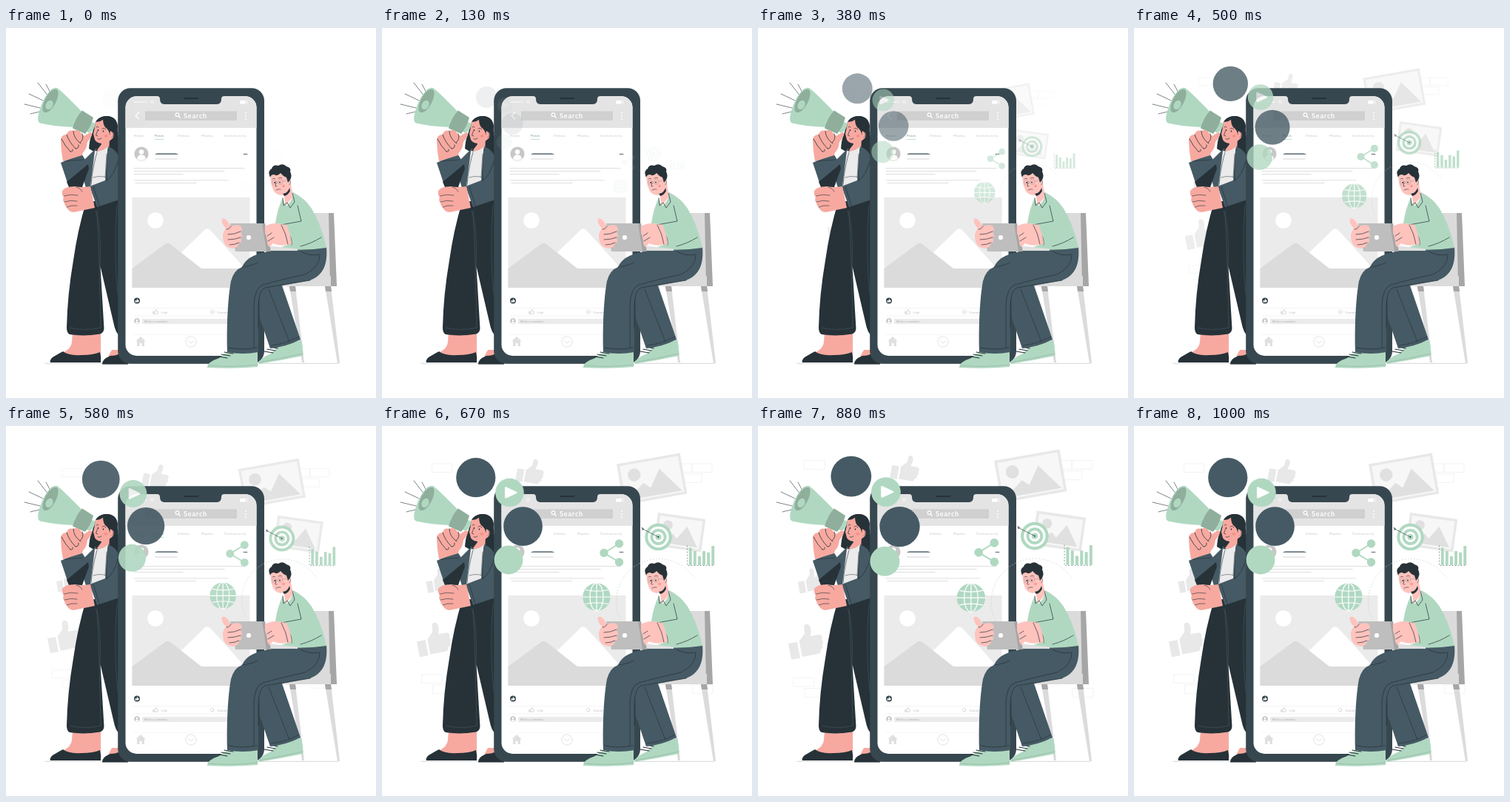
Animation, 500 px wide and 500 px high, one loop 1040 ms. Source, as an HTML page with a canvas:

```html
<!DOCTYPE html>
<html lang="en">
<head>
<meta charset="utf-8">
<title>Social feed</title>
<style>
  html, body { margin: 0; width: 100%; height: 100%; overflow: hidden; background: #fff; }
  canvas { display: block; width: 500px; height: 500px; }
</style>
</head>
<body>
<canvas id="stage"></canvas>
<script>
const SIZE = 500, LOOP = 1040, FRAMES = 25;
const ratio = window.devicePixelRatio || 1;
const INK = '#263238', SLATE = '#455a64', CASE = '#37474f', GREEN = '#b0d8c1',
      MOSS = '#8fae9c', SKIN = '#f7a9a0', ROSE = '#ffc3bd', WHITE = '#fff',
      G1 = '#ebebeb', G2 = '#e0e0e0', G3 = '#c7c7c7', G4 = '#a6a6a6', CHAIR = '#dbdbdb';

function surface(c) {
  c.width = c.height = SIZE * ratio;
  return c.getContext('2d');
}
const screen = surface(document.getElementById('stage'));
const layer = surface(document.createElement('canvas'));
let g = screen;

// ---- drawing helpers ----
function fill(d, color) {
  g.fillStyle = color;
  g.fill(new Path2D(d));
}
function line(d, color = INK, width = 0.7) {
  g.strokeStyle = color;
  g.lineWidth = width;
  g.lineCap = g.lineJoin = 'round';
  g.stroke(new Path2D(d));
}
function oval(x, y, rx, ry, color, turn = 0) {
  g.beginPath();
  g.ellipse(x, y, rx, ry, turn, 0, Math.PI * 2);
  g.fillStyle = color;
  g.fill();
}
const disc = (x, y, r, color) => oval(x, y, r, r, color);
function ring(x, y, r, color, width, rx = r) {
  g.beginPath();
  g.ellipse(x, y, rx, r, 0, 0, Math.PI * 2);
  g.strokeStyle = color;
  g.lineWidth = width;
  g.stroke();
}
function box(x, y, w, h, r, color) {
  g.beginPath();
  g.roundRect(x, y, w, h, r);
  g.fillStyle = color;
  g.fill();
}
function label(text, x, y, px, color, weight = 400, gap = 0.3) {
  g.font = `${weight} ${px}px Lato, Inter, sans-serif`;
  g.letterSpacing = gap + 'px';
  g.fillStyle = color;
  g.fillText(text, x, y);
}
function placed(x, y, degrees, scale, draw) {
  g.save();
  g.translate(x, y);
  g.rotate(degrees * Math.PI / 180);
  g.scale(scale, scale);
  draw();
  g.restore();
}

// ---- backdrop group ----
function thumb(x, y, degrees, scale, color = '#e8e8e8') {
  placed(x, y, degrees, scale, () => fill(
    'M0 21H12V43H0Z M15 21L24 12L25 2Q30 -3 33 4Q34 10 31 17H43Q48 19 45 24Q48 29 44 31' +
    'Q46 36 41 37Q41 42 37 42H15Z', color));
}
function photo(x, y, degrees, w, h) {
  placed(x, y, degrees, 1, () => {
    box(0, 0, w, h, 0, '#e8e8e8');
    box(3.5, 3.5, w - 7, h - 7, 0, '#f7f7f7');
    disc(w * 0.24, h * 0.33, w * 0.1, G2);
    const b = h - 5.5;
    fill(`M7 ${b}L${w * 0.36} ${h * 0.56}L${w * 0.46} ${h * 0.7}L${w * 0.64} ${h * 0.29}` +
         `L${w - 6} ${b}Z`, G2);
  });
}
function brick(x, y) {
  line(`M${x} ${y}h27v11.5h-27Z`, G1, 0.6);
}
function backdrop() {
  for (const [x, y] of [[68, 51], [419, 51], [405, 65], [392, 51], [54, 336],
                        [69, 350], [420, 350]]) brick(x, y);
  photo(373, 117, 8, 65, 45);
  photo(317, 51.5, -10, 87, 56);
  thumb(43, 271, -11, 0.98);
  thumb(57, 196, -10, 0.7);
  thumb(186, 41, 10, 0.78);
}

// ---- badges on the left of the phone ----
function badges() {
  disc(126.8, 69.7, 26.6, SLATE);
  disc(172.5, 90, 19.3, GREEN);
  fill('M166 83.5Q166 81.5 168 82.5L182 89Q183.5 90 182 91L168 97.5Q166 98 166 96Z', WHITE);
  disc(190.5, 135.7, 26.4, SLATE);
  disc(171, 181, 19.4, GREEN);
}

// ---- icons on the right ----
function icons() {
  g.setLineDash([1, 3]);
  g.beginPath();
  g.arc(374, 237, 57.5, 2.7, 5.7);
  g.strokeStyle = '#c0d3c8';
  g.lineWidth = 0.7;
  g.stroke();
  line('M412.5 162V188.5H450', SLATE, 0.6);
  g.setLineDash([]);

  line('M320.5 159L300 171.5L320.5 184', GREEN, 2);
  for (const [x, y] of [[320.5, 159], [300, 171.5], [320.5, 184]]) disc(x, y, 5.7, GREEN);

  disc(290, 231, 18.7, GREEN);
  ring(290, 231, 18.7, WHITE, 1.2, 9);
  line('M290 212V250M271 231H309M275 221.5Q290 225 305 221.5M275 240.5Q290 237 305 240.5', WHITE, 1.2);

  [18.3, 14.2, 11, 7.2, 4].forEach((r, i) => disc(373.5, 150, r, i % 2 ? WHITE : GREEN));
  line('M352 139L373.5 150M351.5 137.5L354 139L352.5 140.5Z', INK, 0.6);
  disc(373.5, 150, 0.9, INK);

  [23.5, 19, 12, 19, 17, 26].forEach((h, i) => box(414.8 + i * 6.1, 188 - h, 3.9, h, 0, GREEN));
}

// ---- phone ----
function avatar(x, y, r) {
  disc(x, y, r, G3);
  disc(x, y - r * 0.25, r * 0.34, WHITE);
  fill(`M${x - r * 0.6} ${y + r * 0.75}Q${x - r * 0.6} ${y + r * 0.12} ${x} ${y + r * 0.12}` +
       `Q${x + r * 0.6} ${y + r * 0.12} ${x + r * 0.6} ${y + r * 0.75}Q${x} ${y + r * 1.1} ${x - r * 0.6} ${y + r * 0.75}Z`, WHITE);
}
function header() {
  box(161.5, 92.3, 177, 42.7, [15, 15, 0, 0], '#e4e4e4');
  fill('M204 92Q208 92 208 96Q208 103 214 103H285Q291 103 291 96Q291 92 295 92Z', CASE);
  line('M241 95H259', INK, 2);
  for (let i = 0; i < 5; i++) disc(174 + i * 3.7, 100, 1.1, WHITE);
  line('M195 99.3Q197.5 97.2 200 99.3M196.3 101Q197.5 100 198.7 101', WHITE, 0.9);
  box(316, 98, 8, 4.5, 1, WHITE);
  line('M326 98V102.5', WHITE, 0.7);
  line('M179.5 114L175 118.5L179.5 123', WHITE, 1.3);
  box(188, 112.5, 124, 12.5, 0, '#d0d0d0');
  ring(231.5, 117.3, 2.4, WHITE, 1.2);
  line('M233.3 119.2L235.3 121.2', WHITE, 1.4);
  label('Search', 240, 122, 9.2, WHITE, 700, 0.75);
  for (const y of [115, 119, 123]) disc(324, y, 0.9, WHITE);
}
function post() {
  const tab = '#bdbdbd';
  label('Home', 173, 147, 4.5, tab);
  label('Posts', 201, 147, 4.5, MOSS, 700);
  label('Videos', 232, 147, 4.5, tab, 400, 0.45);
  label('Photos', 264, 147, 4.5, tab, 400, 0.45);
  label('Community', 295, 147, 4.5, tab, 400, 0.8);
  line('M201.5 150.5H213', GREEN, 0.8);
  avatar(183, 170, 9.6);
  line('M202 170.5H232M204 169.8H230', SLATE, 0.8);
  line('M202 177H231', G3, 0.8);
  for (const x of [321.7, 323.5, 325.3]) disc(x, 170.5, 0.7, INK);
  line('M173 189.5H322M173 193.5H295M173 197.5H239M173 205.8H300M175 209.5H257', '#c9c9c9', 0.6);

  box(170.5, 229, 159, 122, 0, G1);
  disc(202, 260, 10.8, WHITE);
  fill('M220 320L268 273Q272 269.5 276 273L323 325H230Z', WHITE);
  fill('M170.5 325L215 292Q218.5 289 222 292L264 325H329.5V351H170.5Z', '#dbdbdb');

  disc(177, 368.5, 4, CASE);
  thumb(174.5, 366, 0, 0.11, WHITE);
  line('M172 378.5H330M172 389H330', G1, 0.6);
  placed(199, 380.5, 0, 0.14, () =>
    line('M0 20H10V42H0ZM14 20L24 10V0Q33 -2 32 17H44V40H14Z', '#b5b5b5', 3.5));
  label('Like', 210, 386, 4.2, '#b5b5b5');
  ring(278.8, 383.7, 2.2, '#b5b5b5', 0.5);
  label('Comment', 285.5, 386, 4.2, '#b5b5b5');
  avatar(177, 396, 3.8);
  box(184, 393, 144, 7, 0, G1);
  label('Write a comment...', 187, 398, 3.6, G4, 400, 0.25);

  line('M172 414.5H330', '#f2f2f2', 0.6);
  fill('M182 417L188.5 423H187V430H183.7V426H180.3V430H177V423H175.5Z', G2);
  ring(250, 424, 7.2, G2, 0.9);
  line('M246.8 422.8L250 426L253.2 422.8', G2, 0.9);
}
function phone() {
  box(151.2, 81.2, 197.8, 372.6, 17, CASE);
  box(161.5, 92.3, 177, 350.7, 15, WHITE);
  header();
  post();
}

// ---- woman with megaphone ----
function megaphone() {
  line('M43 74L57 92M54 76L61 89M31 89L50 98M25 103L46 108M33 116L46 113', INK, 0.6);
  fill('M69 81Q72 82 102.5 113L91 134Q66 133 46 128.5Q40 126 47 106Q58 79 69 81Z', GREEN);
  oval(60, 98.5, 17.5, 7.5, MOSS, -1.08);
  oval(58.5, 104, 6.5, 4.7, GREEN, -1.08);
  fill('M109 124L121 129Q119 139 113 142L105 138Z', GREEN);
  fill('M103 111.5L118 121Q115 133 107 143L90 135.5Q94 121 103 111.5Z', MOSS);
}
function womanLegs() {
  fill('M90 411H128V443Q100 447 75 440Q89 433 89 424Z', SKIN);
  fill('M143 435H156V448H136Z', SKIN);
  fill('M60 452Q58 447 68 442Q73 439 77 437Q84 443 102 442Q118 442 127 438Q129 445 128 452Z', INK);
  fill('M130 454.5Q129 448 141 443Q150 443 155 439L165 446V454.5Z', INK);
  fill('M108 236L154 228V416Q148 413 145 397L127.5 322Q130 365 132.5 406Q132 412 127 413.5' +
       'Q105 417 86 414Q82 412 82 405Q83 360 91 314Q97 272 108 236Z', INK);
  line('M121 247Q129 263 127 325M123 247Q126 303 128 404M150 240Q145 300 151 360M86 405Q106 410 128 405', SLATE, 0.6);
}
function womanHead() {
  fill('M121 127C126 117 149 114 151 132Q150 145 154 153V188L139 181Q124 170 112 163Q113 150 116 144Z', INK);
  fill('M128 147L140 150L139 167Q130 174 123 165L129 157Z', SKIN);
  fill('M121 127Q128 126 132 123Q135 133 144 139Q148 147 142 151Q139 154 134 156' +
       'Q123 157 120 151L118 143Q120 136 121 127Z', SKIN);
  fill('M122 126C128 117 145 116 149 128L147 143L141 139L140 145Q140 138 134 134Q131 130 131 123Q127 128 122 126Z', INK);
  line('M122 134Q123 132 125 134M130 136Q133 134 135 137M123.5 139L121.5 145L124 146M124 150Q127 151 129 149', INK, 0.7);
  disc(124.5, 138, 0.9, INK);
  disc(131.5, 139.5, 0.9, INK);
  oval(135, 146, 2.6, 1.8, '#f48f87');
  line('M144 142Q147 144 143 148', INK, 0.5);
}
function womanBody() {
  fill('M122 162L106 178L101 192L108 216H118L122 190Z', SLATE);
  fill('M120 166Q130 168 138 160L148 172L140 210Q128 216 114 214Z', G1);
  line('M118 202Q128 199 136 202M136 170L134 202', INK, 0.5);
  line('M123 168Q117 188 115 212', INK, 0.6);
  fill('M74 182L102 170L111 184L83 209Z', SLATE);
  fill('M82 208L111 184L112 190L103 215H85Z', INK);
  line('M79 180L104 178', INK, 0.6);
  fill('M138 160Q151 165 153 177V232L123 242L113 214L134 206Z', SLATE);
  line('M138 163Q135 183 136 207M118 214L126 240M151 180Q146 200 136 206', INK, 0.7);
}
function womanHands() {
  fill('M74 151Q75 144 82 144Q84 137 91 139Q98 136 102 143L106 146Q113 140 116 142' +
       'Q117 146 110 154Q109 164 104 168L103 172L77 180Q74 165 74 151Z', SKIN);
  line('M75 150Q80 160 87 167M82 144Q85 154 94 163M91 139Q91 149 101 156M103 143Q106 150 100 155M87 167Q91 168 90 164M94 163Q99 163 98 158', INK, 0.8);
  fill('M114 214Q101 216 94 214Q79 214 76 220Q75 225 78 228Q76 233 79 236Q79 240 82 242' +
       'Q84 248 91 249L120 243Z', SKIN);
  line('M78 227Q87 224 97 226M79 235Q88 232 96 234M82 242Q89 239 96 240M95 215Q101 217 103 221', INK, 0.6);
}
function woman() {
  womanLegs();
  womanHead();
  womanBody();
  megaphone();
  womanHands();
}

// ---- chair and seated man ----
function chair() {
  fill('M409 250H437L441 349H400Z', CHAIR);
  fill('M436 250H443L447 349H438Z', G4);
  fill('M366 335H439V349H370Z', CHAIR);
  fill('M383 349H391L403 452H400Z', CHAIR);
  fill('M431 349H439L451 453H448Z', CHAIR);
  fill('M383 349H391L392 356H384ZM431 349H439L440 356H432Z', G4);
}
function manLegs() {
  fill('M341 454Q343 446 358 440Q368 429 374 427L399 422Q402 433 401 443Q372 449 341 454Z', GREEN);
  line('M349 437L361 439M353 434L364 436M357 431L367 433', INK, 1.1);
  line('M341 452Q370 447 401 440', MOSS, 0.6);
  fill('M342 352L372 345L398 421Q378 431 357 433L343 392Z', SLATE);
  line('M355 353L383 424M358 429Q378 427 396 417', INK, 0.6);
  fill('M272 458Q273 451 288 446Q298 437 304 438H340V458Q306 461 272 459Z', GREEN);
  line('M287 444L299 446M291 441L303 443M295 438L307 440', INK, 1.1);
  line('M273 456Q306 459 340 455', MOSS, 0.6);
  fill('M366 298L433 296C435 319 429 334 411 341Q379 347 350 352Q341 354 341 379V438' +
       'Q320 442 299 438C298 399 300 364 304 342Q308 327 319 323Q325 308 350 303Z', SLATE);
  line('M411 341Q379 346 350 351Q341 354 341 379V404M424 307Q424 323 404 333Q372 340 347 347Q336 351 335 375V431' +
       'M301 432Q320 436 339 432M319 323Q331 322 340 317M398 302Q411 309 424 306', INK, 0.7);
}
function manHead() {
  fill('M374 217L384 205L388 228L378 240Z', ROSE);
  fill('M358 196Q368 191 381 200Q387 203 384 209L382 218Q377 225 371 226Q362 224 360 216Q356 206 358 196Z', ROSE);
  fill('M357 202Q353 193 359 190Q361 184 368 186Q374 182 379 187Q386 189 384 194Q387 200 384 205' +
       'L381 209L379 202Q374 200 371 196Q367 201 362 198Q358 198 357 202Z', INK);
  ring(362.5, 209, 3.2, '#a58a8c', 0.5, 2.7);
  ring(370.5, 208, 3.4, '#a58a8c', 0.5);
  line('M374 207L381 206', '#a58a8c', 0.5);
  line('M360 204Q362 202 364 204M368 203Q371 201 373 203M365 208L364 214L366 214M365 219Q368 217 371 218', INK, 0.6);
  disc(363, 209, 0.9, INK);
  disc(370, 208.5, 0.9, INK);
  oval(375, 213.5, 2.3, 1.7, '#ff9c95');
  line('M382 206Q387 206 383 212', INK, 0.5);
  fill('M374 224Q381 223 383 216L384 220Q381 226 376 227Z', INK);
}
function manBody() {
  manHead();
  fill('M374 229Q376 239 380 240Q389 230 388 222Q404 230 413 244Q426 265 433 297Q400 302 366 298' +
       'L384 292L372 265L364 264Q366 247 374 229Z', GREEN);
  line('M374 230L375 240L380 236L384 243L390 235L387 223M372 266L399 261L394 240M382 278Q387 285 386 293M398 295Q413 291 426 283', INK, 0.7);
}
function tablet() {
  fill('M354 294L394 298.5V301H352Z', G2);
  fill('M303 264H348L355 302H310Z', '#bebebe');
  fill('M346 264H350L358 302H352Z', G4);
  disc(328, 283, 3.1, WHITE);
  fill('M350 268Q360 262 372 265L379 266Q385 279 386 292Q370 296 361 291L356 296Q352 292 353 287L350 276Z', ROSE);
  line('M353 281L359 277M354 288L362 283M372 266Q379 279 381 292', INK, 0.7);
  fill('M292 258Q296 256 300 262L304 268Q315 264 318 269Q320 273 317 276Q321 281 317 284' +
       'Q320 289 315 291Q314 297 306 298Q297 297 294 289Q291 277 297 271Q290 263 292 258Z', ROSE);
  line('M300 279Q309 279 317 275M300 286Q309 286 317 283M302 293Q309 293 315 290M304 268Q302 272 298 272', INK, 0.7);
}
function man() {
  chair();
  manLegs();
  manBody();
  tablet();
}

// ---- motion ----
// Overshooting ease: cubic-bezier(.36, -.01, .5, 1.38)
function ease(x) {
  const curve = (s, a, b) => 3 * (1 - s) ** 2 * s * a + 3 * (1 - s) * s * s * b + s ** 3;
  let lo = 0, hi = 1;
  for (let i = 0; i < 24; i++) {
    const mid = (lo + hi) / 2;
    if (curve(mid, 0.36, 0.5) < x) lo = mid; else hi = mid;
  }
  return curve(hi, -0.01, 1.38);
}
function zoomIn(draw, cx, cy, p) {
  const s = 0.5 + 0.5 * p;
  g = layer;
  g.setTransform(ratio, 0, 0, ratio, 0, 0);
  g.clearRect(0, 0, SIZE, SIZE);
  g.translate(cx, cy);
  g.scale(s, s);
  g.translate(-cx, -cy);
  draw();
  g = screen;
  g.globalAlpha = Math.min(1, Math.max(0, p));
  g.drawImage(layer.canvas, 0, 0, SIZE, SIZE);
  g.globalAlpha = 1;
}
function render(ms) {
  const step = Math.min(FRAMES - 1, Math.floor((ms % LOOP + 4.9) * 0.024));
  const p = ease((step + 1) / FRAMES);
  g = screen;
  g.setTransform(ratio, 0, 0, ratio, 0, 0);
  g.fillStyle = WHITE;
  g.fillRect(0, 0, SIZE, SIZE);
  zoomIn(backdrop, 246.5, 200, p);
  line('M53 453.3H448', '#b5b9bb', 0.6);
  woman();
  phone();
  zoomIn(badges, 159, 122, p);
  zoomIn(icons, 360, 194, p);
  man();
}

const start = performance.now();
function tick() {
  render(performance.now() - start);
  requestAnimationFrame(tick);
}
tick();
</script>
</body>
</html>
```
